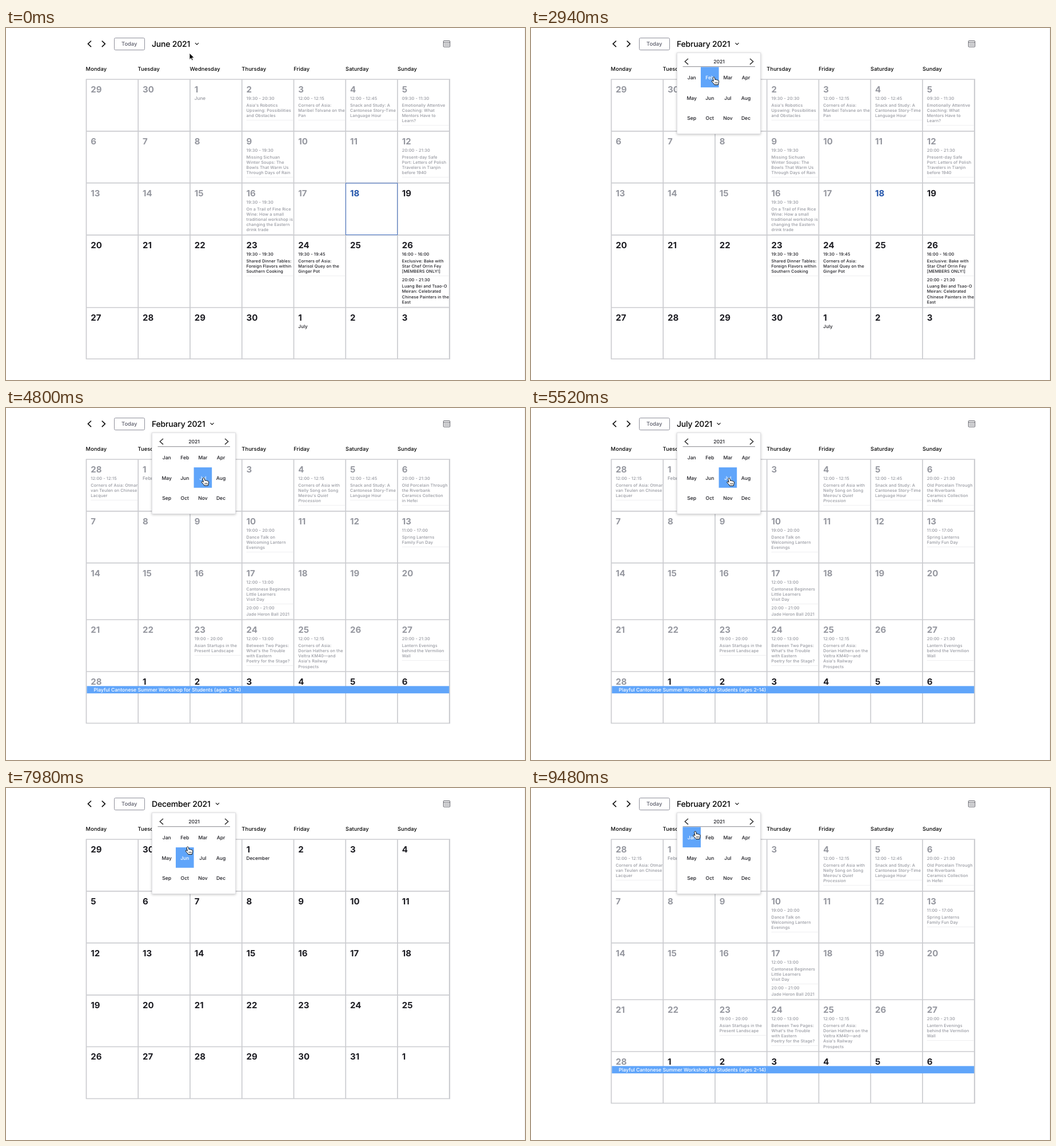
An HTML page that plays this animation: 908x617 px, repeating every 9.54 s.

```html
<!DOCTYPE html>
<html lang="en">
<head>
<meta charset="utf-8">
<title>Event calendar</title>
<style>
html, body { margin: 0; width: 100%; height: 100%; overflow: hidden; background: #fff; }
svg { display: block; width: 908px; height: 617px; font-family: Inter, Roboto, sans-serif; font-weight: 500; }
text { fill: #1b1b21; white-space: pre; text-rendering: geometricPrecision; }
.title { font-size: 14px; letter-spacing: -.2px; fill: #000; }
.week { font-size: 9.3px; letter-spacing: .1px; fill: #000; }
.today { font-size: 9.4px; fill: #5c5d6b; }
.num { font-size: 15px; font-weight: 700; }
.label { font-size: 8.2px; }
.time { font-size: 7.4px; letter-spacing: .1px; }
.name { font-size: 7.25px; letter-spacing: .12px; }
.past { fill: #95979f; }
.now { fill: #2355ab; }
.bar { font-size: 8.6px; fill: #fff; }
.grid { fill: none; stroke: #cbccd0; stroke-width: 1.7; }
.rule { stroke: #efeff1; stroke-width: 1; }
.icon { fill: none; stroke: #111; stroke-width: 1.7; }
.blue { fill: #60a5fa; }
.pop { font-size: 8.6px; text-anchor: middle; }
.panel { fill: #fff; stroke: #dcdce0; stroke-width: .8; filter: drop-shadow(0 1.5px 2px rgba(0,0,0,.25)); }
</style>
</head>
<body>
<svg id="stage" viewBox="0 0 908 617">
  <path d="M907.5 0V617" stroke="#f1f1f3"/>
  <path class="icon" d="M149 22.5L143.5 27.8L149 33.1M167.8 22.5L173.3 27.8L167.8 33.1"/>
  <rect x="189.5" y="17.5" width="53" height="21" rx="2" fill="#fff" stroke="#8f909b"/>
  <text class="today" x="202" y="31.4">Today</text>
  <text class="title" id="title" x="255" y="33.4"></text>
  <path class="icon" id="caret" d="M-3 -1.5L0 1.5L3 -1.5" style="stroke-width:1.1"/>
  <g fill="none" stroke="#55565e">
    <rect x="765.3" y="22.5" width="11.4" height="10.6" rx=".8"/>
    <path d="M765.3 25.3H776.7"/>
    <path d="M767.2 27.8H775.5M767.2 30.4H775.5" stroke-width="1.3" stroke-dasharray="1.3 .9"/>
  </g>
  <g id="weeks"></g>
  <g id="months"></g>
  <rect id="focus" x="594.5" y="272" width="90.3" height="90.5" fill="none" stroke="#4472c4"/>
  <g id="popup">
    <rect class="panel" x="255.5" y="43.5" width="146" height="142"/>
    <path class="icon" d="M275 53.7L269.3 58.8L275 63.9M383 53.7L388.7 58.8L383 63.9" style="stroke:#333;stroke-width:1.5"/>
    <path d="M265.5 67.7H392" stroke="#85868c"/>
    <text class="pop" x="329" y="62">2021</text>
  </g>
  <g id="cursor" stroke-linejoin="round">
    <path id="arrow" d="M0 0V11.4L2.7 8.9L4.4 13L6.3 12.2L4.6 8.2H8.2Z" stroke="#fff" stroke-width=".9"/>
    <g id="hand" stroke="#000" stroke-width=".95" fill="#fff">
      <path d="M-1.8 1.6C-1.8 -.4 1 -.5 1.3 1.3L2.1 4.9C2.7 4 4.1 4.1 4.4 5.2C5.1 4.5 6.4 4.8 6.6 5.8C7.5 5.3 8.5 5.9 8.6 7.1C8.8 9 7.9 10.6 7.4 13.5H.9C.3 11.7 -1.8 10.2 -3.6 7.8C-4.3 6.5 -2.8 5.6 -1.6 6.6L-.6 7.5Z"/>
      <path d="M2.1 8.6V11.4M4 8.5V11.4M5.8 8.5V11.4" stroke-width=".7"/>
    </g>
  </g>
</svg>
<script>
const LOOP = 9540, STEP = 60, LEFT = 140.5, COL = 90.75;
const $ = id => document.getElementById(id);

function add(parent, tag, attrs, text) {
  const el = document.createElementNS('http://www.w3.org/2000/svg', tag);
  for (const k in attrs) el.setAttribute(k, attrs[k]);
  if (text !== undefined) el.textContent = text;
  parent.append(el);
  return el;
}

const SERIES = 'Corners of Asia';
const STUDY = '12:00 - 12:45|Snack and Study: A|Cantonese Story-Time|Language Hour';
const CAMP = 'Playful Cantonese Summer Workshop for Students (ages 2-14)';

// lead: trailing days of the month before; past: number of grey cells; bars: [row, first column]
const MONTHS = [
  {
    title: 'June 2021', caret: 334, lead: [29, 30], days: 30, past: 19, today: 19,
    tops: [90, 180.9, 271.7, 362.8, 490, 580], labels: { 2: 'June', 32: 'July' }, bars: [],
    events: {
      3: ["19:30 - 20:30|Asia's Robotics|Upswing: Possibilities|and Obstacles"],
      4: [`12:00 - 12:15|${SERIES}:|Maribel Tolvane on the|Pan`],
      5: [STUDY],
      6: ['09:30 - 11:30|Emotionally Attentive|Coaching: What|Mentors Have to|Learn?'],
      10: ['19:30 - 19:30|Missing Sichuan|Winter Soups: The|Bowls That Warm Us|Through Days of Rain'],
      13: ['20:00 - 21:30|Present-day Safe|Port: Letters of Polish|Travelers in Tianjin|before 1940'],
      17: ['19:30 - 19:30|On a Trail of Fine Rice|Wine: How a small|traditional workshop is|changing the Eastern|drink trade'],
      24: ['19:30 - 19:30|Shared Dinner Tables:|Foreign Flavors within|Southern Cooking'],
      25: [`19:30 - 19:45|${SERIES}:|Marisol Quey on the|Ginger Pot`],
      27: ['16:00 - 16:00|Exclusive: Bake with|Star Chef Orrin Fey|[MEMBERS ONLY!]',
        '20:00 - 21:30|Luang Bei and Tsao-O|Meiran: Celebrated|Chinese Painters in the|East']
    }
  },
  {
    title: 'February 2021', caret: 360.5, lead: [28], days: 28, past: 29,
    tops: [90, 180.9, 271.7, 371, 462, 552.5], labels: { 1: 'February' }, bars: [[4, 0]],
    events: {
      0: [`12:00 - 12:15|${SERIES}: Otmar|van Teulen on Chinese|Lacquer`],
      4: [`12:00 - 12:15|${SERIES} with|Nelly Song on Song|Meirou's _Quiet|_Procession`],
      5: [STUDY],
      6: ['20:00 - 21:30|Old Porcelain Through|the Riverbank|Ceramics Collection|in Hefei'],
      10: ['19:00 - 20:00|Dance Talk on|Welcoming Lantern|Evenings'],
      13: ['11:00 - 17:00|Spring Lanterns|Family Fun Day'],
      17: ['12:00 - 13:00|Cantonese Beginners|Little Learners|Visit Day', '20:00 - 21:00|Jade Heron Ball 2021'],
      23: ['19:00 - 20:00|Asian Startups in the|Present Landscape'],
      24: ["12:00 - 13:00|Between Two Pages:|What's the Trouble|with Eastern|Poetry for the Stage?"],
      25: [`12:00 - 12:15|${SERIES}:|Dorian Hathers on the|Veltra KM40—and|Asia's Railway|Prospects`],
      27: ['20:00 - 21:30|Lantern Evenings|behind the Vermilion|Wall']
    }
  },
  {
    title: 'July 2021', caret: 328.5, lead: [28, 29, 30, 31], days: 31, past: 0,
    tops: [90, 180.9, 272, 363, 454, 545], labels: { 4: 'July' }, bars: [[2, 1], [3, 0], [4, 0]],
    events: {
      11: ['19:30 - 20:30|Coins Matter: How the|Mobile Purse Can|Shape Trade—and|the Market'],
      13: ['20:00 - 21:30|The Scholarly|Appointment Tests in|Anhui and the Scholarly|Appointment Archive|of Anhui in Hefei'],
      17: ['19:30 - 19:30|Surviving Change|Through Song: The|First Decade'],
      24: ['19:30 - 19:30|Lantern Tailors: Sorrow|Meets Laughter in a|Year of Rain'],
      31: ['19:30 - 19:30|Herons and Lanterns:|Hardship and Courage|in Postwar Tianjin']
    }
  },
  {
    title: 'December 2021', caret: 370, lead: [29, 30, 31], days: 31, past: 0,
    tops: [90, 180.9, 271.7, 362.8, 453.5, 544.5], labels: { 3: 'December' }, bars: [], events: {}
  }
];

function addEvents(g, list, x, y, tone) {
  for (const item of list) {
    const [time, ...lines] = item.split('|');
    add(g, 'text', { class: 'time' + tone, x, y: y + 2.7 }, time);
    lines.forEach((line, i) => {
      const [plain, slanted] = line.split('_');
      const el = add(g, 'text', { class: 'name' + tone, x, y: y + 14.1 + i * 9.2 }, plain);
      if (slanted) add(el, 'tspan', { 'font-style': 'italic' }, slanted);
    });
    y += 19 + lines.length * 9.2;
    const ry = Math.round(y - 9.2) + .5;
    add(g, 'path', { class: 'rule', d: `M${x} ${ry}H${x + 81.5}` });
    y -= 2;
  }
}

function buildMonth(m) {
  const g = add($('months'), 'g', {});
  const end = m.tops[5];
  for (let i = 0; i < 35; i++) {
    const row = Math.floor(i / 7), x = LEFT + COL * (i % 7) + 7.8, y = m.tops[row];
    const day = i < m.lead.length ? m.lead[i] : (i - m.lead.length) % m.days + 1;
    const tone = i < m.past ? ' past' : '';
    add(g, 'text', { class: 'num' + (i === m.today ? ' now' : tone), x, y: y + 22.8 }, day);
    if (m.labels[i]) add(g, 'text', { class: 'label' + tone, x, y: y + 36.4 }, m.labels[i]);
    const shift = m.bars.some(b => b[0] === row) ? 12.8 : 0;
    if (m.events[i]) addEvents(g, m.events[i], x, y + 33.7 + shift, tone);
  }
  let d = m.tops.map(y => `M139.7 ${y}H776.8`).join('');
  for (let c = 0; c < 8; c++) d += `M${LEFT + COL * c} 90V${end}`;
  add(g, 'path', { class: 'grid', d });
  add(g, 'path', { class: 'grid', d: `M776.6 89.2V${end + .8}`, style: 'stroke-width:1' });
  for (const [row, col] of m.bars) {
    const x = LEFT + COL * col + 1, y = m.tops[row] + 25.4;
    add(g, 'rect', { class: 'blue', x, y, width: 775.3 - x, height: 12.8 });
    add(g, 'text', { class: 'bar', x: x + 12, y: y + 9.4 }, CAMP);
  }
  return g;
}

'Monday Tuesday Wednesday Thursday Friday Saturday Sunday'.split(' ').forEach((name, i) =>
  add($('weeks'), 'text', { class: 'week', x: 139.6 + 90.9 * i, y: 75 }, name));

const grids = MONTHS.map(buildMonth);

const cellW = 31.6, cellH = 35.7, cellX = 265.4, cellY = 68.4;
const hover = add($('popup'), 'rect', { class: 'blue', width: cellW, height: cellH });
const names = 'Jan Feb Mar Apr May Jun Jul Aug Sep Oct Nov Dec'.split(' ').map((name, i) =>
  add($('popup'), 'text', {
    class: 'pop', x: cellX + cellW * (i % 4 + .5), y: 90 + cellH * Math.floor(i / 4)
  }, name));

// [time, month index]
const titles = [[0, 0], [2820, 1], [5520, 2], [6960, 3], [8880, 1]];
const pages = [[0, 0], [3120, 1], [5820, 2], [7200, 3], [9120, 1]];
const OPEN = 1440;

// [time, x, y] of the pointer tip
const path = [
  [60, 321, 44], [1140, 329, 26], [1800, 329, 26], [2580, 320, 86], [2940, 320, 86],
  [3600, 322, 88], [4140, 322, 88], [4260, 322.5, 89], [4440, 322.5, 89], [4800, 346, 122.5],
  [5880, 347, 123], [6240, 371, 131], [6360, 371, 132], [6600, 371, 150], [7680, 371, 150],
  [7980, 318, 103], [8400, 315, 86], [9120, 315, 86], [9480, 287.5, 76]
];

const pick = (list, t) => list.filter(e => e[0] <= t).pop()[1];

function pointer(t) {
  const i = path.findIndex(p => p[0] > t);
  if (i < 0) return path[path.length - 1].slice(1);
  if (i === 0) return path[0].slice(1);
  const a = path[i - 1], b = path[i];
  const u = (t - a[0]) / (b[0] - a[0]), k = u * u * (3 - 2 * u);
  return [a[1] + (b[1] - a[1]) * k, a[2] + (b[2] - a[2]) * k];
}

const show = (el, on) => { el.style.display = on ? '' : 'none'; };

function draw(now) {
  const t = Math.floor(now % LOOP / STEP) * STEP;
  const open = t >= OPEN, head = pick(titles, t), page = pick(pages, t);
  const [x, y] = pointer(t);

  $('title').textContent = MONTHS[head].title;
  $('caret').setAttribute('transform', `translate(${MONTHS[head].caret} 27.6)`);
  grids.forEach((g, i) => show(g, i === page));
  show($('focus'), head === 0);
  show($('popup'), open);

  const c = Math.floor((x - cellX) / cellW), r = Math.floor((y + 2 - cellY) / cellH);
  const inside = c >= 0 && c < 4 && r >= 0 && r < 3;
  show(hover, inside);
  if (inside) {
    hover.setAttribute('x', cellX + c * cellW);
    hover.setAttribute('y', cellY + r * cellH);
  }
  names.forEach((el, i) => { el.style.fill = inside && i === r * 4 + c ? '#fff' : ''; });

  const arrow = !open && y > 36;
  show($('arrow'), arrow);
  show($('hand'), !arrow);
  $('cursor').setAttribute('transform', `translate(${x} ${y})`);
}

function tick() {
  draw(performance.now());
  requestAnimationFrame(tick);
}
tick();
</script>
</body>
</html>
```
